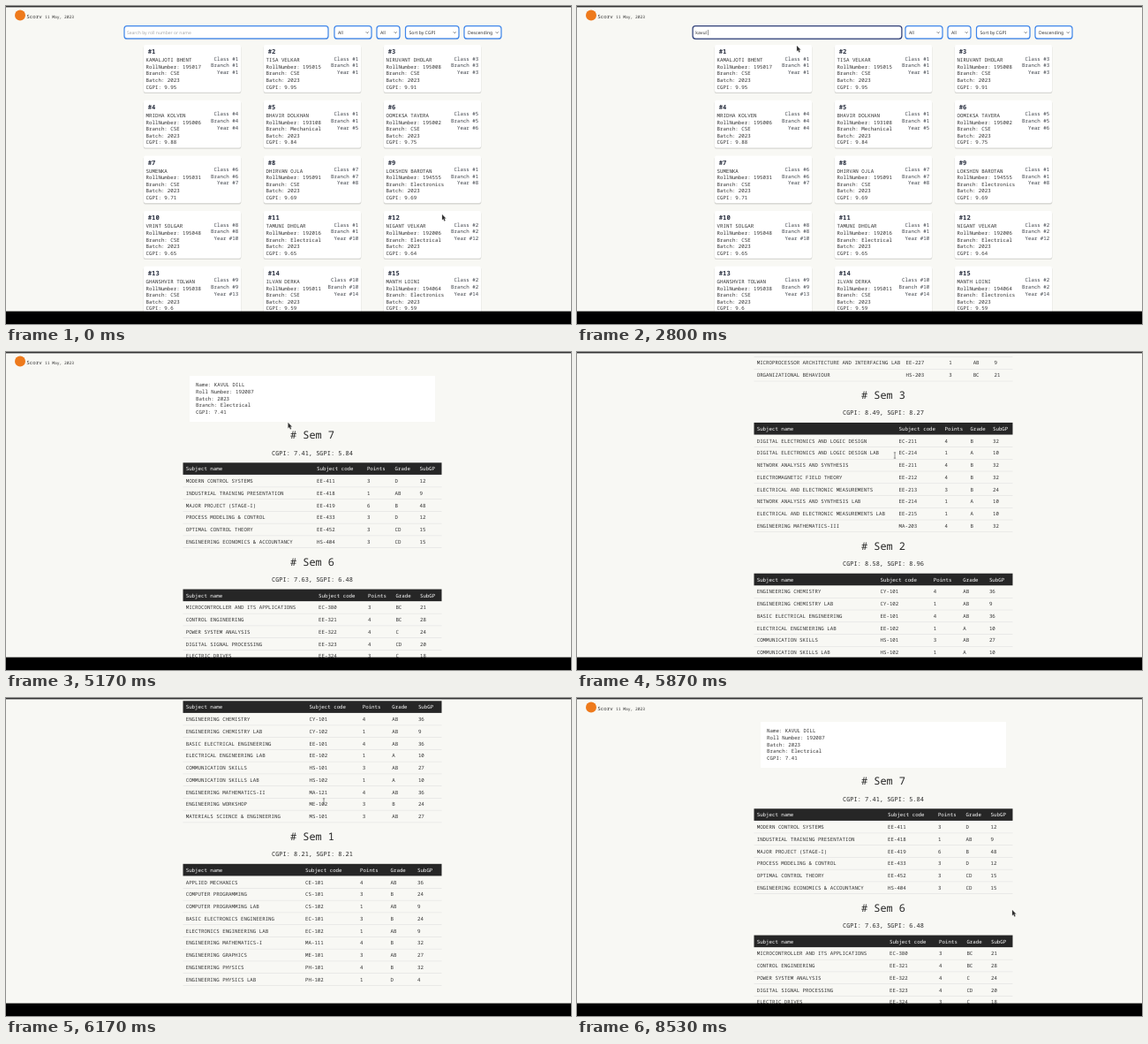
An HTML page for the animation above (8710 ms loop, 640 by 360 pixels).

```html
<!DOCTYPE html>
<html lang="en">
<head>
<meta charset="utf-8">
<title>Student ranking</title>
<style>
html, body { margin: 0; width: 100%; height: 100%; overflow: hidden; background: #f8f8f4; }
svg { display: block; width: 100vw; height: 100vh; }
text { font-family: "Noto Sans Mono", "DejaVu Sans Mono", monospace; white-space: pre; text-rendering: geometricPrecision; fill: #333; }
.ui { font-family: "Noto Sans", "Open Sans", sans-serif; }
</style>
</head>
<body>
<svg id="stage" viewBox="0 0 640 360"></svg>
<script>
const LOOP = 8710, SIZE = 5.77;
const stage = document.getElementById('stage');

function add(parent, tag, attrs = {}, text) {
  const node = document.createElementNS('http://www.w3.org/2000/svg', tag);
  for (const key in attrs) node.setAttribute(key, attrs[key]);
  if (text !== undefined) node.textContent = text;
  parent.append(node);
  return node;
}
const group = parent => add(parent, 'g');
const rect = (parent, x, y, width, height, fill, more) =>
  add(parent, 'rect', { x, y, width, height, fill, ...more });
// y is the middle of the capitals
const write = (parent, x, y, text, size = SIZE, more) =>
  add(parent, 'text', { x, y: y + size * .36, 'font-size': size, ...more }, text);
const show = (node, on) => node.setAttribute('display', on ? 'inline' : 'none');

rect(stage, 0, 0, 640, 360, '#f8f8f4');
const scroller = group(stage);

// Header
add(scroller, 'circle', { cx: 16, cy: 10.5, r: 6, fill: '#ee7a1c' });
write(scroller, 23.3, 12, 'Scorv');
write(scroller, 44, 12, '11 May, 2023', 4.6);

// Ranking list
function card(parent, slot, rank, [name, roll, branch, cgpi, inClass, inBranch, inYear]) {
  const x = 156 + slot % 3 * 136, y = 44 + Math.floor(slot / 3) * 62.7;
  rect(parent, x - .3, y + 1, 110.6, 54, '#d8d8d4', { rx: 2 });
  rect(parent, x, y, 110, 53.7, '#fff', { rx: 2 });
  write(parent, x + 4.8, y + 7.6, '#' + rank, 7.2, { 'font-weight': 600, style: 'fill:#2a3040' });
  [name, 'RollNumber: ' + roll, 'Branch: ' + branch, 'Batch: 2023', 'CGPI: ' + cgpi]
    .forEach((line, i) => write(parent, x + 2.6, y + 17.2 + i * 7.6, line));
  ['Class #' + inClass, 'Branch #' + inBranch, 'Year #' + inYear]
    .forEach((line, i) => write(parent, x + 107.2, y + 15.6 + i * 7.6, line, SIZE,
      { 'text-anchor': 'end', style: 'fill:#3c4048' }));
}

const students = `KAMALJOTI BHENT,195017,CSE,9.95,1,1,1
TISA VELKAR,195015,CSE,9.95,1,1,1
NIRUVANT DHOLAR,195008,CSE,9.91,3,3,3
MRIDHA KOLVEN,195006,CSE,9.88,4,4,4
BHAVIR DOLKHAN,193108,Mechanical,9.84,1,1,5
OOMIKSA TAVERA,195002,CSE,9.75,5,5,6
SUMENKA,195031,CSE,9.71,6,6,7
DHIRVAN OJLA,195091,CSE,9.69,7,7,8
LOKSHIN BAROTAN,194555,Electronics,9.69,1,1,8
VRINT SOLGAR,195048,CSE,9.65,8,8,10
TAMUNI DHOLAR,192016,Electrical,9.65,1,1,10
NIGANT VELKAR,192006,Electrical,9.64,2,2,12
GHANSHVIR TOLWAN,195038,CSE,9.6,9,9,13
ILVAN DERKA,195011,CSE,9.59,10,10,14
MANTH LOINI,194064,Electronics,9.59,2,2,14`.split('\n').map(line => line.split(','));

const list = group(scroller), cards = group(list), found = group(list);
students.forEach((student, i) => card(cards, i, i + 1, student));
card(found, 1, 1, ['KAVUL DILL', 192087, 'Electrical', 7.41, 98, 98, 796]);

// Search field and selects
function box(parent, x, width) {
  rect(parent, x - .3, 23.2, width + .6, 15, '#d4dae2', { rx: 3.5 });
  return rect(parent, x, 22.7, width, 14.2, '#fff', { rx: 3, stroke: '#3f86ea', 'stroke-width': 1.2 });
}
const search = group(list);
const field = box(search, 134, 231);
const query = write(search, 137, 30, '', 5, { class: 'ui' });
const caret = rect(search, 0, 27, .5, 6, '#333');
[[372, 42, 'All'], [420, 26, 'All'], [452.5, 60.5, 'Sort by CGPI'], [519, 42, 'Descending']]
  .forEach(([x, width, label]) => {
    box(list, x, width);
    write(list, x + 4, 30, label, 5.1, { class: 'ui' });
    add(list, 'path', { d: `M${x + width - 6.2} 29.3l1.4 1.4 1.4-1.4`, fill: 'none', stroke: '#333', 'stroke-width': .7 });
  });

// Student page
const page = group(scroller);
rect(page, 208, 27, 278, 52, '#fff');
['Name: KAVUL DILL', 'Roll Number: 192087', 'Batch: 2023', 'Branch: Electrical', 'CGPI: 7.41']
  .forEach((line, i) => write(page, 215, 37.2 + i * 7.65, line));

// Per term: number, CGPI, SGPI, left edge of the code column, then the subjects
const terms = [
  [7, '7.41', '5.84', 352, `MODERN CONTROL SYSTEMS,EE-411,3,D
INDUSTRIAL TRAINING PRESENTATION,EE-418,1,AB
MAJOR PROJECT (STAGE-I),EE-419,6,B
PROCESS MODELING & CONTROL,EE-433,3,D
OPTIMAL CONTROL THEORY,EE-452,3,CD
ENGINEERING ECONOMICS & ACCOUNTANCY,HS-404,3,CD`],
  [6, '7.63', '6.48', 354, `MICROCONTROLLER AND ITS APPLICATIONS,EC-380,3,BC
CONTROL ENGINEERING,EE-321,4,BC
POWER SYSTEM ANALYSIS,EE-322,4,C
DIGITAL SIGNAL PROCESSING,EE-323,4,CD
ELECTRIC DRIVES,EE-324,3,C
CONTROL ENGINEERING LAB,EE-325,1,AB
POWER SYSTEM LAB,EE-326,1,B
ELECTRIC DRIVES LAB,EE-327,1,B`],
  [5, '7.83', '7.21', 352, `COMMUNICATION SYSTEMS,EC-310,3,BC
ELECTRICAL MACHINES-II,EE-311,4,BC
TRANSMISSION AND DISTRIBUTION,EE-312,4,B
SIGNALS AND SYSTEMS,EE-313,4,C
POWER GENERATION,EE-314,3,BC
ELECTRICAL MACHINES-II LAB,EE-315,1,AB
SIMULATION LAB,EE-316,1,AB
COMMUNICATION SYSTEMS LAB,EC-317,1,B`],
  [4, '8.08', '7.43', 372.5, `ELECTRICAL MACHINES-I,EE-221,4,BC
POWER ELECTRONICS,EE-222,4,BC
MICROPROCESSOR ARCHITECTURE,EE-223,4,C
NUMERICAL METHODS,MA-204,3,B
ELECTRICAL MACHINES-I LAB,EE-225,1,AB
POWER ELECTRONICS LAB,EE-226,1,BC
MICROPROCESSOR ARCHITECTURE AND INTERFACING LAB,EE-227,1,AB
ORGANIZATIONAL BEHAVIOUR,HS-203,3,BC`],
  [3, '8.49', '8.27', 364.5, `DIGITAL ELECTRONICS AND LOGIC DESIGN,EC-211,4,B
DIGITAL ELECTRONICS AND LOGIC DESIGN LAB,EC-214,1,A
NETWORK ANALYSIS AND SYNTHESIS,EE-211,4,B
ELECTROMAGNETIC FIELD THEORY,EE-212,4,B
ELECTRICAL AND ELECTRONIC MEASUREMENTS,EE-213,3,B
NETWORK ANALYSIS AND SYNTHESIS LAB,EE-214,1,A
ELECTRICAL AND ELECTRONIC MEASUREMENTS LAB,EE-215,1,A
ENGINEERING MATHEMATICS-III,MA-203,4,B`],
  [2, '8.58', '8.96', 343.5, `ENGINEERING CHEMISTRY,CY-101,4,AB
ENGINEERING CHEMISTRY LAB,CY-102,1,AB
BASIC ELECTRICAL ENGINEERING,EE-101,4,AB
ELECTRICAL ENGINEERING LAB,EE-102,1,A
COMMUNICATION SKILLS,HS-101,3,AB
COMMUNICATION SKILLS LAB,HS-102,1,A
ENGINEERING MATHEMATICS-II,MA-121,4,AB
ENGINEERING WORKSHOP,ME-102,3,B
MATERIALS SCIENCE & ENGINEERING,MS-101,3,AB`],
  [1, '8.21', '8.21', 339, `APPLIED MECHANICS,CE-101,4,AB
COMPUTER PROGRAMMING,CS-101,3,B
COMPUTER PROGRAMMING LAB,CS-102,1,AB
BASIC ELECTRONICS ENGINEERING,EC-101,3,B
ELECTRONICS ENGINEERING LAB,EC-102,1,AB
ENGINEERING MATHEMATICS-I,MA-111,4,B
ENGINEERING GRAPHICS,ME-101,3,AB
ENGINEERING PHYSICS,PH-101,4,B
ENGINEERING PHYSICS LAB,PH-102,1,D`]
];
const gradeValue = { A: 10, AB: 9, B: 8, BC: 7, C: 6, CD: 5, D: 4 };

let termY = 94;
for (const [number, cgpi, sgpi, codeX, subjects] of terms) {
  const shift = codeX - 339;
  const columns = [203.7, codeX, 401 + shift * .608, 435.5 + shift * .392, 466 + shift * .196];
  const row = (y, cells, more) => cells.forEach((cell, i) => write(page, columns[i], y, cell, SIZE, more));
  const heading = { 'text-anchor': 'middle', 'font-weight': 500, style: 'fill:#262626' };
  write(page, 347, termY, '# Sem ' + number, 11.9, heading);
  write(page, 347, termY + 20, `CGPI: ${cgpi}, SGPI: ${sgpi}`, 6.97, heading);
  rect(page, 200.5, termY + 31.3, 293, 13.6, '#262626');
  row(termY + 38.2, ['Subject name', 'Subject code', 'Points', 'Grade', 'SubGP'],
    { 'font-weight': 500, style: 'fill:#fff' });
  const rows = subjects.split('\n');
  rows.forEach((line, i) => {
    const [name, code, points, grade] = line.split(',');
    const y = termY + 52 + i * 13.75;
    row(y, [name, code, points, grade, points * gradeValue[grade]]);
    rect(page, 200.5, y + 6.6, 293, .6, '#e0e0e0');
  });
  termY += 60.75 + rows.length * 13.75;
}

// Fixed edges and pointer
rect(stage, 0, 0, 640, 1.4, '#333');
rect(stage, 0, 345.6, 640, 14.4, '#000');
const arrow = add(stage, 'path', {
  d: 'M0 0V6.2L1.4 5 2.5 7.4 3.6 6.9 2.6 4.6H4.4Z', fill: '#2c2c2c', stroke: '#888', 'stroke-width': .3
});
const beam = add(stage, 'path', {
  d: 'M-1.2-3.2H1.2M0-3.2V3.2M-1.2 3.2H1.2', stroke: '#666', 'stroke-width': .7
});

// Time, x, y
const path = [
  [0, 494, 236], [270, 494, 236], [400, 258, 122], [630, 258, 122], [830, 162, 252], [1150, 548, 60],
  [1500, 297, 31], [1750, 297, 31], [2250, 249, 45], [3900, 249, 45], [4450, 319.5, 80], [5330, 319.5, 80],
  [5430, 360, 117], [6630, 360, 117], [6770, 225, 200], [6970, 440, 322], [7650, 440, 322],
  [8050, 493, 232], [8270, 493, 232], [8530, 493, 240], [LOOP, 493, 240]
];
const typed = 'kavul dill';
const keyTimes = [2150, 2300, 2430, 2530, 2630, 2730, 2850, 3070, 3130, 3190];
const BOTTOM = 948.25;

const progress = (t, from, to) => Math.min(1, Math.max(0, (t - from) / (to - from)));
const easeOut = p => 1 - (1 - p) ** 3.478;

function pointerAt(t) {
  const i = path.findIndex(point => point[0] > t);
  const [t0, x0, y0] = path[i - 1], [t1, x1, y1] = path[i];
  const p = progress(t, t0, t1), k = p * p * (3 - 2 * p);
  return [x0 + (x1 - x0) * k, y0 + (y1 - y0) * k];
}

function draw(t) {
  const onPage = t >= 4530;
  show(list, !onPage);
  show(page, onPage);
  show(cards, t < 3630);
  show(found, t >= 3630);
  page.setAttribute('opacity', progress(t, 4560, 4800));

  const offset = BOTTOM * (easeOut(progress(t, 5730, 6170)) - easeOut(progress(t, 7270, 8000)));
  scroller.setAttribute('transform', `translate(0 ${-offset})`);

  const focus = progress(t, 1570, 1720), scale = 1 + .025 * focus;
  search.setAttribute('transform', `translate(249.5 30) scale(${scale}) translate(-249.5 -30)`);
  field.setAttribute('stroke', focus < 1 ? '#3f86ea' : '#2f3f78');
  const count = keyTimes.filter(time => time <= t).length;
  query.textContent = count ? typed.slice(0, count) : 'Search by roll number or name';
  query.style.fill = count ? '#333' : '#a8a8a8';
  show(caret, focus > 0);
  if (!onPage) caret.setAttribute('x', 137 + (count ? query.getComputedTextLength() : -.5));

  const [x, y] = pointerAt(t);
  const overText = t > 1300 && t < 2250 && y < 37 && x < 365 || t >= 5400 && t < 7800;
  show(arrow, !overText);
  show(beam, overText);
  (overText ? beam : arrow).setAttribute('transform', `translate(${x} ${y})`);
}

const start = performance.now();
function tick() {
  draw((performance.now() - start) % LOOP);
  requestAnimationFrame(tick);
}
tick();
</script>
</body>
</html>
```
